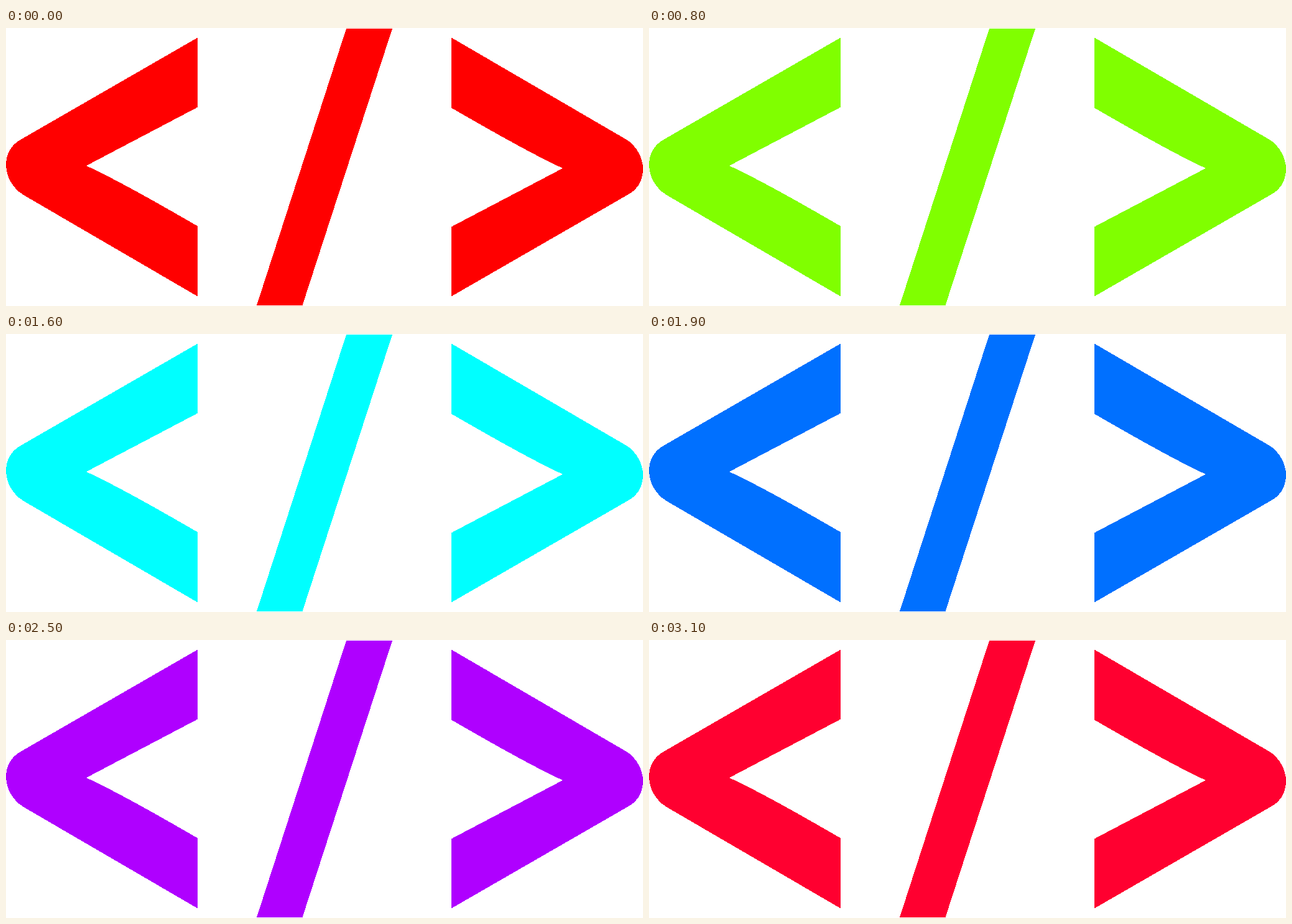
These frames come from a looping animation (1024 px wide and 448 px high, 3200 ms). An HTML page:

```html
<!DOCTYPE html>
<html lang="en">
<head>
<meta charset="utf-8">
<title>Code tag</title>
<style>
  html, body { margin: 0; width: 100%; height: 100%; overflow: hidden; background: #fff; }
  svg { display: block; width: 100%; height: 100%; }
</style>
</head>
<body>
<svg id="tag" viewBox="0 0 1024 448" fill="#f00" shape-rendering="crispEdges">
  <path id="bracket" d="M308 15.5 L25 179 C8 188 0 203 0 221 C0 240 12 260 28 269 L308 432.5 V319.3 Q182 246 129 222 L308 127.7 Z"/>
  <path d="M547 1 H621 L476.5 447 H403 Z"/>
  <use href="#bracket" transform="rotate(180 512 224)"/>
</svg>
<script>
  const STEP = 100, STEPS = 32;
  const tag = document.getElementById('tag');

  // The hue goes once round the colour wheel in equal hard steps.
  function draw() {
    const step = Math.floor(performance.now() / STEP) % STEPS;
    tag.setAttribute('fill', `hsl(${step * 360 / STEPS}, 100%, 50%)`);
    requestAnimationFrame(draw);
  }
  draw();
</script>
</body>
</html>
```
